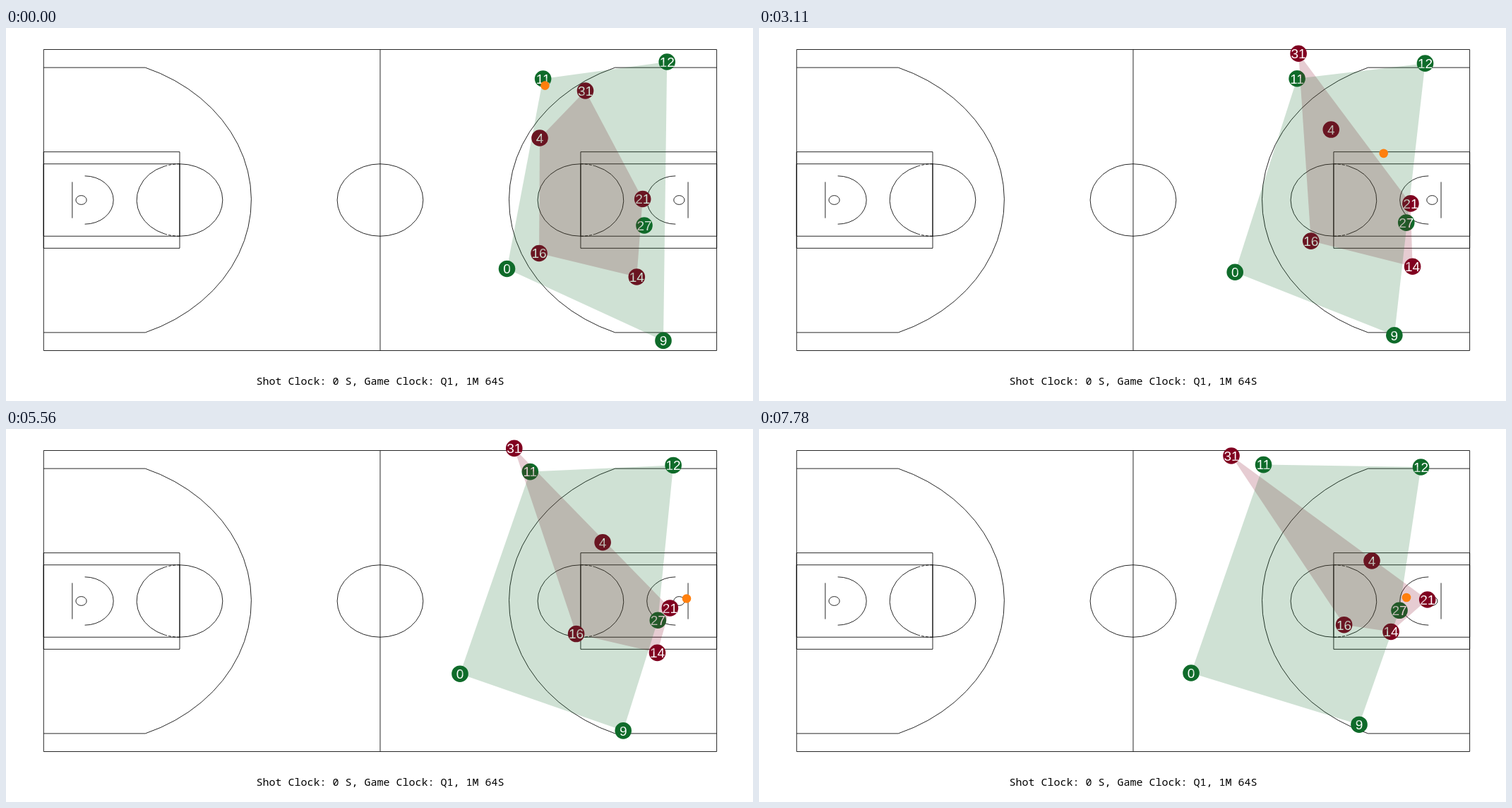
Animation, 1058 px wide and 529 px high, one loop 8 s. Source, as an HTML page with a canvas:

```html
<!DOCTYPE html>
<html lang="en">
<head>
<meta charset="utf-8">
<title>Basketball play</title>
<style>
html, body { margin: 0; width: 100%; height: 100%; overflow: hidden; background: #fff; }
canvas { display: block; }
</style>
</head>
<body>
<canvas id="stage" width="1058" height="529"></canvas>
<script>
const ctx = document.getElementById('stage').getContext('2d');
const LOOP = 8000, STEPS = 36, RIM_STEP = 25;
const GREEN = '#0f6b2a', RED = '#800020', ORANGE = '#ff7f0e';
const COURT = { left: 53.3, right: 1006.6, top: 30.5, bottom: 457.5 };
const FT_X = (COURT.right - COURT.left) / 94, FT_Y = (COURT.bottom - COURT.top) / 50;

// Each run is a smooth curve through points evenly spaced in time
const red = {
  4: [[756, 156], [801.8, 143], [840.4, 157.2], [868, 187]],
  14: [[893.3, 353], [913.6, 345.2], [929.3, 332.6], [919.6, 314.3], [895, 287.5]],
  16: [[755, 319.5], [776.5, 304.6], [803.7, 292.4], [828.6, 277.7]],
  21: [[901.7, 242.5], [918.8, 247], [938.2, 254], [946.7, 242]],
  31: [[820.5, 89], [773, 41.5], [727, 27.2], [669, 38]]
};
const green = {
  0: [[709.5, 341.5], [664.6, 346.8], [612, 346]],
  9: [[931, 443.4], [891.8, 433.4], [850, 419.2]],
  11: [[760.6, 72], [764.2, 73.3], [746.2, 62.5], [714.5, 50.6]],
  12: [[936.2, 48], [942.4, 49.9], [945.4, 51.2], [937.5, 54]],
  27: [[904, 280], [914, 276.5], [923.5, 272.5], [907, 257.3]]
};
const shot = [[763.4, 81.6], [872.8, 168.4], [964, 240.5]];
const rebound = [[964, 240.5], [917, 239]];

// Polynomial through all points, u from 0 to 1
function along(points, u) {
  const v = u * (points.length - 1);
  let x = 0, y = 0;
  points.forEach((point, i) => {
    const weight = points.reduce((w, _, j) => j === i ? w : w * (v - j) / (i - j), 1);
    x += weight * point[0];
    y += weight * point[1];
  });
  return { x, y };
}

const locate = (team, u) =>
  Object.entries(team).map(([label, run]) => ({ label, ...along(run, u) }));

const locateBall = k => k < RIM_STEP
  ? along(shot, k / RIM_STEP)
  : along(rebound, (k - RIM_STEP) / (STEPS - 1 - RIM_STEP));

function convexHull(points) {
  const sorted = [...points].sort((a, b) => a.x - b.x || a.y - b.y);
  const chain = list => {
    const out = [];
    for (const p of list) {
      while (out.length > 1) {
        const a = out[out.length - 2], b = out[out.length - 1];
        if ((b.x - a.x) * (p.y - a.y) - (b.y - a.y) * (p.x - a.x) > 0) break;
        out.pop();
      }
      out.push(p);
    }
    return out.slice(0, -1);
  };
  return [...chain(sorted), ...chain(sorted.reverse())];
}

// Builds a path in feet, strokes it with an unscaled pen
function strokeFeet(mirrored, build, dash = []) {
  ctx.save();
  ctx.setLineDash(dash);
  ctx.beginPath();
  ctx.save();
  ctx.translate(mirrored ? COURT.right : COURT.left, COURT.top);
  ctx.scale(mirrored ? -FT_X : FT_X, FT_Y);
  build();
  ctx.restore();
  ctx.stroke();
  ctx.restore();
}

function line(x1, y1, x2, y2) {
  ctx.moveTo(x1, y1);
  ctx.lineTo(x2, y2);
}

function circle(x, y, r, from = 0, to = 2 * Math.PI) {
  ctx.moveTo(x + r * Math.cos(from), y + r * Math.sin(from));
  ctx.arc(x, y, r, from, to);
}

function drawHalf(mirrored) {
  const up = Math.PI / 2, gap = 0.36, reach = Math.asin(22 / 23.75);
  strokeFeet(mirrored, () => {
    ctx.moveTo(0, 3);
    ctx.arc(5.25, 25, 23.75, -reach, reach);
    ctx.lineTo(0, 47);
    ctx.rect(0, 17, 19, 16);
    circle(19, 25, 6, -up, up);
    circle(19, 25, 6, up + gap, 3 * up - gap);
    circle(5.25, 25, 0.75);
    circle(5.75, 25, 4, -up, up);
    line(4, 22, 4, 28);
  });
  strokeFeet(mirrored, () => ctx.rect(0, 19, 19, 12));
  strokeFeet(mirrored, () => {
    circle(19, 25, 6, up, up + gap);
    circle(19, 25, 6, 3 * up - gap, 3 * up);
  }, [4, 2]);
}

function drawCourt() {
  ctx.strokeStyle = '#000';
  ctx.lineWidth = 0.85;
  strokeFeet(false, () => {
    ctx.rect(0, 0, 94, 50);
    line(47, 0, 47, 50);
    circle(47, 25, 6);
  });
  drawHalf(false);
  drawHalf(true);
  ctx.fillStyle = '#000';
  ctx.textAlign = 'center';
  ctx.font = '300 15px "Noto Sans Mono", monospace';
  ctx.fillText('Shot Clock: 0 S, Game Clock: Q1, 1M 64S', 530, 505.5);
}

function disc(p, r, color) {
  ctx.fillStyle = color;
  ctx.beginPath();
  ctx.arc(p.x, p.y, r, 0, 2 * Math.PI);
  ctx.fill();
}

function drawPlayers(players, color) {
  ctx.font = '19px "Liberation Sans", Arial, sans-serif';
  for (const p of players) {
    disc(p, 11.8, color);
    ctx.fillStyle = '#fff';
    ctx.fillText(p.label, p.x, p.y + 6.8);
  }
}

function drawHull(players, color) {
  ctx.globalAlpha = 0.2;
  ctx.fillStyle = color;
  ctx.beginPath();
  for (const p of convexHull(players)) ctx.lineTo(p.x, p.y);
  ctx.fill();
  ctx.globalAlpha = 1;
}

function frame(now) {
  // A few ms of lead keep step changes on the 10 ms grid
  const k = Math.min(STEPS - 1, Math.floor((now % LOOP + 6) * STEPS / LOOP));
  const u = k / (STEPS - 1);
  const reds = locate(red, u), greens = locate(green, u);
  ctx.fillStyle = '#fff';
  ctx.fillRect(0, 0, 1058, 529);
  drawCourt();
  drawPlayers(reds, RED);
  drawPlayers(greens, GREEN);
  drawHull(reds, RED);
  drawHull(greens, GREEN);
  disc(locateBall(k), 6.3, ORANGE);
  requestAnimationFrame(frame);
}
requestAnimationFrame(frame);
</script>
</body>
</html>
```
